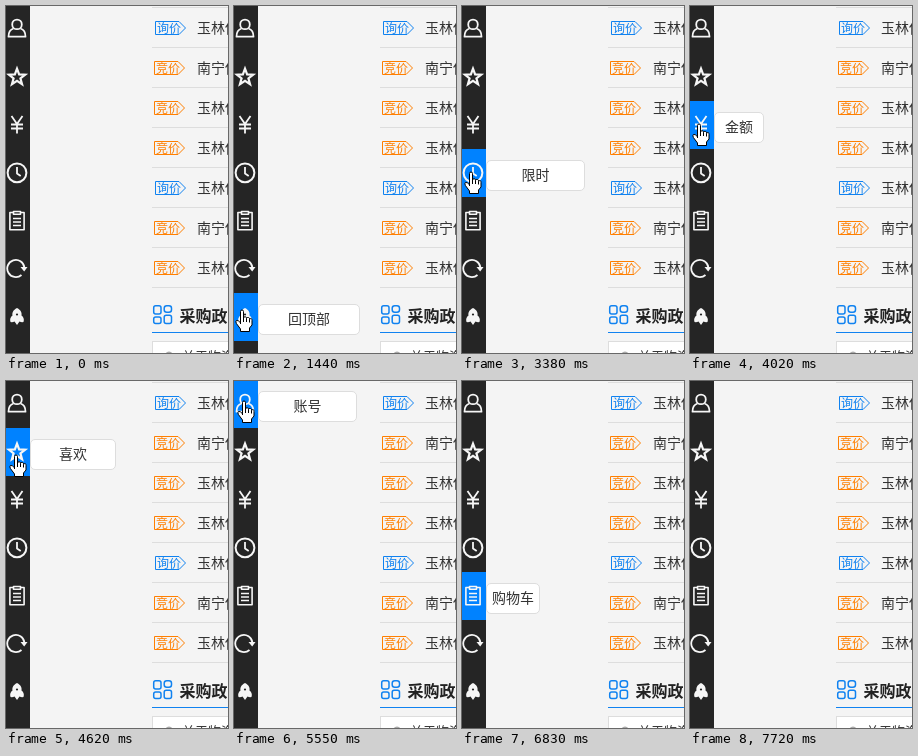
An HTML page that plays this animation: 222x347 px, repeating every 8000 ms.

```html
<!DOCTYPE html>
<html lang="zh-CN">
<head>
<meta charset="utf-8">
<title>Sidebar hover labels</title>
<style>
  html, body { margin: 0; width: 100%; height: 100%; overflow: hidden; background: #f4f4f4; }
  body, text { font-family: "Noto Sans CJK SC", "Noto Sans CJK", sans-serif; }
  svg { position: absolute; left: 0; top: 0; display: block; }
  #label {
    position: absolute; left: 24px; height: 31px; box-sizing: border-box; overflow: hidden;
    border: 1px solid #ddd; border-radius: 5px; background: #fff; color: #333;
    font-size: 14px; line-height: 27px; text-align: center; word-break: break-all;
  }
  .icons { fill: none; stroke: #f6f6f6; stroke-width: 1.8; stroke-linejoin: round; }
  .solid { fill: #f6f6f6; stroke: none; }
</style>
</head>
<body>
<svg width="222" height="347" viewBox="0 0 222 347">
  <g id="rows"></g>

  <g fill="none" stroke="#1082f0" stroke-width="1.5">
    <rect x="147.7" y="299.7" width="7.3" height="8.3" rx="2"/>
    <rect x="158.2" y="299.7" width="7.3" height="6.5" rx="2.5"/>
    <rect x="147.7" y="311" width="7.3" height="6.5" rx="2"/>
    <rect x="158.2" y="309.2" width="7.3" height="8.3" rx="2"/>
  </g>
  <text x="173.5" y="316" font-size="16" font-weight="700" fill="#222">采购政策</text>
  <rect x="146" y="326" width="76" height="1" fill="#1082f0"/>
  <rect x="146.5" y="335.5" width="90" height="40" fill="#fff" stroke="#ddd"/>
  <circle cx="163" cy="349" r="3.5" fill="#aaa"/>
  <text x="176" y="355" font-size="13" fill="#333">关于物资</text>

  <rect width="24" height="347" fill="#252525"/>
  <rect id="highlight" width="24" height="48" fill="#0082ff"/>
  <g class="icons">
    <circle cx="11" cy="18.4" r="4.8"/>
    <path d="M7.5 22.5Q2.5 24 2.5 30.7H19.5Q19.5 24 14.5 22.5"/>
    <path id="star" stroke-width="2.2" stroke-linejoin="miter"/>
    <path d="M5.5 110L11 118L16.5 110M11 118V127.5M5 118.5H17M5 122.5H17"/>
    <circle cx="11" cy="166.8" r="9.4" stroke-width="2"/>
    <path d="M11 161V167.5L14.7 170"/>
    <path d="M7 206.5H3.9V223.7H18.1V206.5H15M7.5 205.5H14.5V208.3H7.5ZM7 212.5H15M7 216H15M7 219.5H15" stroke-width="1.6"/>
    <path d="M15.5 269A8.6 8.6 0 1 1 18.4 261.5"/>
    <path class="solid" d="M14.5 261H21.5L18.2 265.5Z"/>
    <path class="solid" d="M11 302C15 304 16 307 15.5 309.5Q18.8 312 17.5 316Q15.5 316.5 13.5 315.5L11 319L8.5 315.5Q6.5 316.5 4.5 316Q3.2 312 6.5 309.5C6 307 7 304 11 302Z"/>
    <circle cx="11" cy="308.5" r="1.1" fill="#252525" stroke="none"/>
  </g>
</svg>
<div id="label"></div>
<svg width="222" height="347" viewBox="0 0 222 347">
  <g id="cursor" fill="#fff" stroke="#000" stroke-linejoin="round">
    <path d="M-1.5 14V1.5a1.5 1.5 0 0 1 3 0V8a1.5 1.5 0 0 1 3 .5a1.5 1.5 0 0 1 3 1a1.3 1.3 0 0 1 2.5 1V15L7.5 18V21.5H-1.5V19L-5.6 13.5q-1-2 0-3q1.6-.8 4.1 2.3z"/>
    <path d="M1.5 7.5V12M4.5 8.5V12M7.5 9.5V12.5"/>
  </g>
</svg>
<script>
const LOOP = 8000, OPEN_TIME = 500, LABEL_WIDTH = 102, CELL = 48;
const $ = id => document.getElementById(id);
const labels = ["账号", "喜欢", "金额", "限时", "购物车", "刷新", "回顶部"];

// The pointer climbs from the last cell to the first, then returns faster.
// These are the moments it crosses into the next cell; it is away in the first and last span.
const crossings = [0, 702, 1850, 2400, 2935, 3775, 4250, 5105, 5930, 6200, 6430, 6573, 6960, 7720, LOOP];
const TURN = labels.length;
const LAST_VISIT = 2 * TURN - 2;

const crossingY = i => CELL * Math.max(TURN + 1 - i, i - TURN) - 1;

function pointerAt(t, visit) {
  const start = crossings[visit];
  const k = (t - start) / (crossings[visit + 1] - start);
  const dip = visit === TURN ? 27 * Math.sin(Math.PI * k) : 0;
  const y = crossingY(visit) + (crossingY(visit + 1) - crossingY(visit)) * k - dip;
  const drift = Math.max(0, t - 5550) * 0.03;
  return [10 - y / 150 - drift, y].map(Math.round);
}

function drawRows() {
  let html = "";
  for (let i = 0; i < 8; i++) {
    const y = 1 + 40 * i;
    html += `<rect x="146" y="${y}" width="76" height="1" fill="#ddd"/>`;
    if (i === 7) break;
    const inquiry = i % 4 === 0;
    const color = inquiry ? "#1082f0" : "#ff7f00";
    const x = inquiry ? 149.5 : 148.5;
    const city = i % 4 === 1 ? "南宁" : "玉林";
    html += `<path d="M${x} ${y + 14.5}h23.5l6.5 6.5l-6.5 6.5h-23.5z" fill="none" stroke="${color}"/>
      <text x="${x + 1.5}" y="${y + 25.5}" font-size="12" fill="${color}">${inquiry ? "询价" : "竞价"}</text>
      <text x="191" y="${y + 26}" font-size="14" fill="#333">${city}供应</text>`;
  }
  $("rows").innerHTML = html;
}

function drawStar() {
  const points = Array.from({ length: 10 }, (_, i) => {
    const r = i % 2 ? 3.6 : 8.6, a = Math.PI * (i / 5 - 0.5);
    return `${(11 + r * Math.cos(a)).toFixed(2)} ${(71.3 + r * Math.sin(a)).toFixed(2)}`;
  });
  $("star").setAttribute("d", `M${points.join("L")}Z`);
}

function render(t) {
  const visit = crossings.findLastIndex(start => start <= t);
  const active = visit > 0 && visit <= LAST_VISIT;
  const cell = Math.abs(TURN - visit);
  const top = cell * CELL - 1;
  const progress = Math.min(1, (t - crossings[visit]) / OPEN_TIME);
  const width = Math.round(LABEL_WIDTH * (0.5 - Math.cos(Math.PI * progress) / 2));

  $("highlight").style.display = active ? "" : "none";
  $("highlight").setAttribute("y", top);
  const label = $("label");
  label.style.display = active && width > 1 ? "" : "none";
  label.style.top = `${top + 11}px`;
  label.style.width = `${width}px`;
  label.textContent = labels[cell] || "";
  $("cursor").setAttribute("transform", `translate(${pointerAt(t, visit)})`);
}

drawRows();
drawStar();
const began = performance.now();
function tick() {
  render((performance.now() - began) % LOOP);
  requestAnimationFrame(tick);
}
tick();
</script>
</body>
</html>
```
